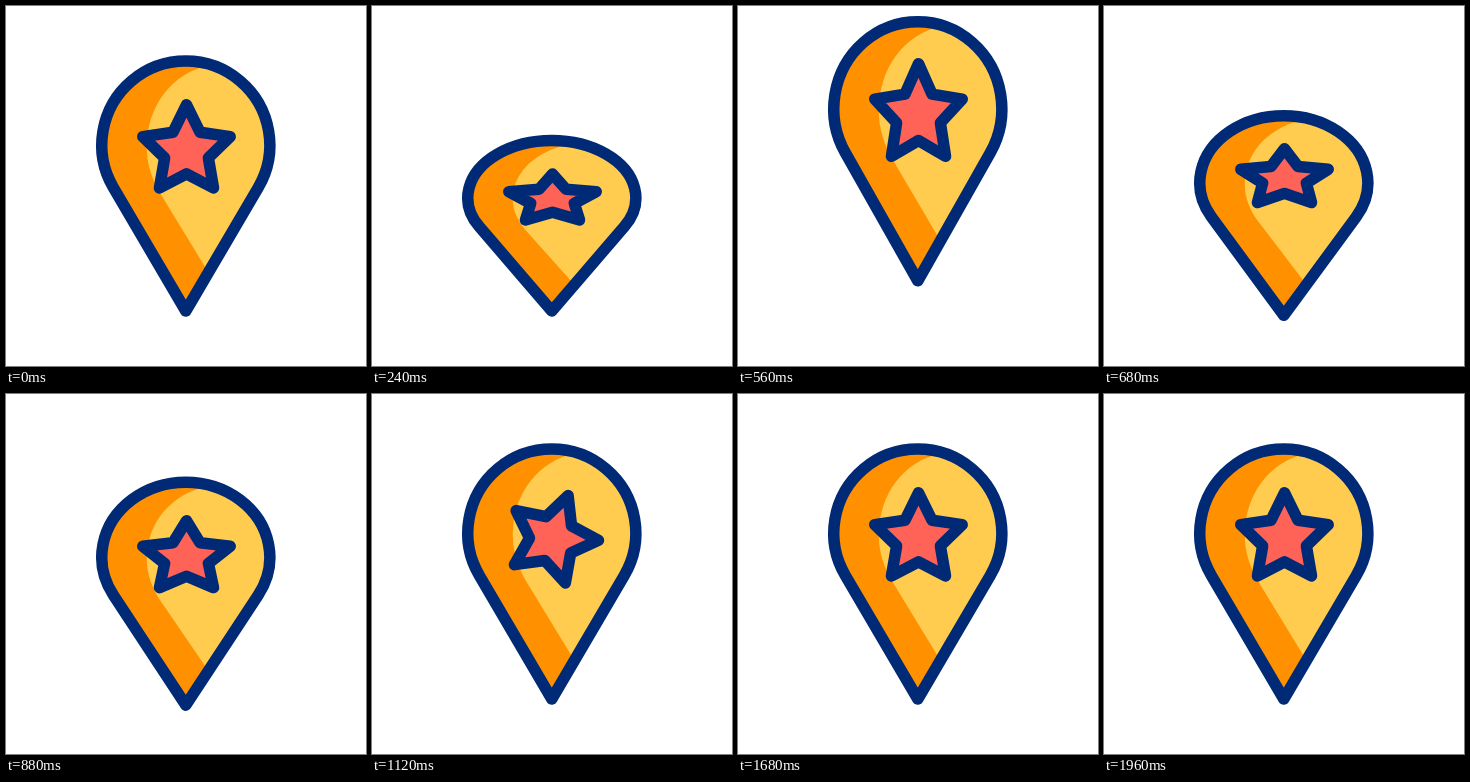
These frames come from a looping animation (360x360 px, 2000 ms). An HTML page:

```html
<!DOCTYPE html>
<html lang="en">
<head>
<meta charset="utf-8">
<title>Bouncing map pin</title>
<style>
  html, body { margin: 0; width: 100%; height: 100%; overflow: hidden; background: #fff; }
  svg { display: block; width: 100vw; height: 100vh; }
  .line { stroke: #002a75; stroke-width: 11.5; stroke-linejoin: round; vector-effect: non-scaling-stroke; }
</style>
</head>
<body>
<svg viewBox="0 0 360 360">
  <defs>
    <!-- Drawn with the tip at the origin -->
    <path id="shape" d="M0 0L-72.4 -123.4A84 84 0 1 1 72.4 -123.4Z"/>
    <clipPath id="inside"><use href="#shape"/></clipPath>
  </defs>
  <g id="pin">
    <use href="#shape" fill="#ff9100"/>
    <path clip-path="url(#inside)" fill="#ffcc50"
      d="M24 -246C-14 -238 -39 -205 -39 -164C-39 -147 -34 -133 -27 -120L26 -33L100 -33V-260H24Z"/>
    <path class="line" fill="none" d="M0 0L-72.4 -123.4A84 84 0 1 1 72.4 -123.4Z"/>
  </g>
  <g id="star"><polygon id="spin" class="line" fill="#ff6257"/></g>
</svg>
<script>
const LOOP = 2000;
const TIMES = [0, 240, 490, 765, 967];   // rest, squash, leap, landing, rest
const TRACKS = {
  tipY: [305, 305, 266.3, 321, 305],
  pinScale: [1, 0.682, 1.095, 0.718, 1],
  starY: [144.8, 193.5, 93.2, 194, 144.8],
  starScale: [1, 0.553, 1.229, 0.489, 1]
};
const SPIN = [967, 1424];

const [pin, star, spin] = ['pin', 'star', 'spin'].map(id => document.getElementById(id));

spin.setAttribute('points', Array.from({ length: 10 }, (_, i) => {
  const r = i % 2 ? 23 : 46, a = i * Math.PI / 5;
  return `${r * Math.sin(a)},${-r * Math.cos(a)}`;
}).join(' '));

function ease(t, from, to) {
  const u = Math.min(1, Math.max(0, (t - from) / (to - from)));
  return (1 - Math.cos(Math.PI * u)) / 2;
}

function sample(track, t) {
  let value = track[0];
  for (let i = 1; i < TIMES.length; i++)
    value += (track[i] - track[i - 1]) * ease(t, TIMES[i - 1], TIMES[i]);
  return value;
}

function draw(t) {
  const at = name => sample(TRACKS[name], t);
  pin.setAttribute('transform', `translate(179.8 ${at('tipY')}) scale(1 ${at('pinScale')})`);
  star.setAttribute('transform', `translate(180.5 ${at('starY')}) scale(1 ${at('starScale')})`);
  spin.setAttribute('transform', `rotate(${360 * ease(t, ...SPIN)})`);
}

function tick() {
  draw(performance.now() % LOOP);
  requestAnimationFrame(tick);
}
tick();
</script>
</body>
</html>
```
